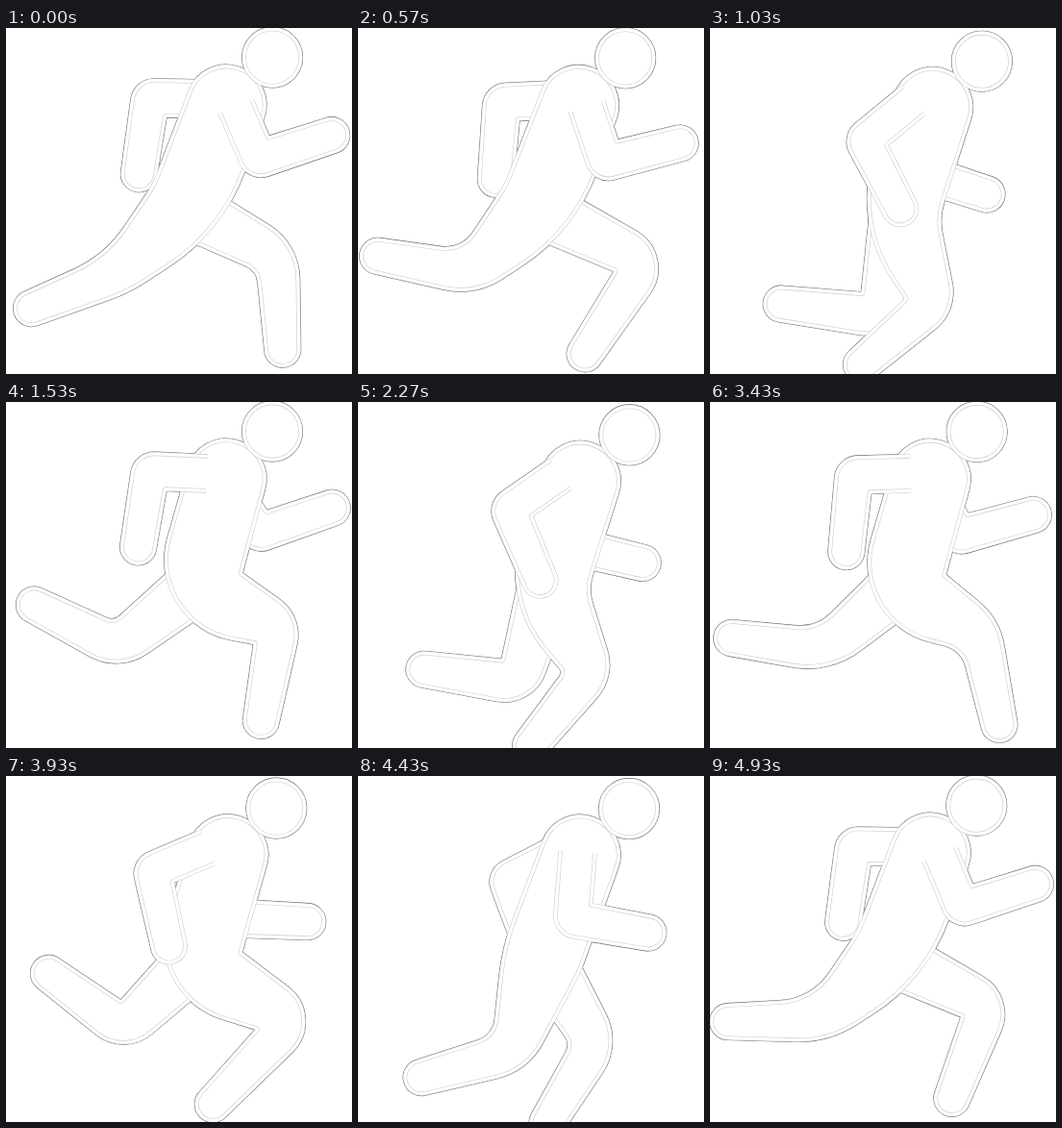
Recreate the animation shown at these times as an HTML page with a canvas. Size 360x360 px, loop 5 s.

```html
<!DOCTYPE html>
<html lang="en">
<head>
<meta charset="utf-8">
<title>Runner</title>
<style>
html, body { margin: 0; width: 100%; height: 100%; overflow: hidden; background: #fff; }
canvas { display: block; width: 360px; height: 360px; }
</style>
</head>
<body>
<canvas id="stage" width="360" height="360"></canvas>
<script>
const ctx = document.getElementById('stage').getContext('2d');
const STRIDE = 18.625;  // ticks per full stride, 30 ticks per second
const LAST = 148;

const wave = turns => Math.cos(2 * Math.PI * turns);

// Angles are in degrees, measured from straight down, forward positive.
function swing([x, y], angle, length) {
  const a = angle * Math.PI / 180;
  return [x + length * Math.sin(a), y + length * Math.cos(a)];
}

function armAt(phase) {
  const c = wave(phase + 0.024);
  const elbow = swing([215, 74], 65 * c - 27, 72 + 7 * c);
  return [elbow, swing(elbow, 50 + 59 * c, 80)];
}

// The trailing leg stays straighter on the near side than on the far side.
function legAt(phase, side) {
  const lift = phase - 0.445, push = phase - 0.05;
  const thigh = 6 + 66 * wave(lift) - 6 * wave(3 * lift);
  const flex = 70 + 12 * wave(phase - 0.25) - 14 * wave(phase)
    - 24 * wave(2 * push) - 8 * wave(4 * push) - side * 19 * Math.max(0, wave(phase));
  const stretch = 0.9 * Math.max(0, flex - 80);
  const knee = swing([194, 197], thigh, 98 + stretch);
  return [knee, swing(knee, thigh - flex, 96 + stretch)];
}

// Tapered limb along joints: rounded outer bends, tight inner bends, round tip.
function limb(pts, widths, bend, roundStart) {
  const path = new Path2D(), end = pts.length - 1;
  const dirs = pts.slice(1).map(([x, y], i) => {
    const dx = x - pts[i][0], dy = y - pts[i][1], len = Math.hypot(dx, dy) || 1;
    return [dx / len, dy / len];
  });
  const edge = (i, s) => {
    const [ax, ay] = dirs[Math.max(0, i - 1)], [bx, by] = dirs[Math.min(end - 1, i)];
    const k = s * widths[i] / Math.max(0.4, 1 + ax * bx + ay * by);
    return [pts[i][0] - (ay + by) * k, pts[i][1] + (ax + bx) * k];
  };
  const corner = (i, s, next) => {
    const [ax, ay] = dirs[i - 1], [bx, by] = dirs[i];
    const inner = 1 + 160 * (bend - 1) * Math.max(0, ax * bx + ay * by) ** 3;
    const outside = (ax * by - ay * bx) * s < 0;
    path.arcTo(...edge(i, s), ...edge(next, s), inner + (outside ? widths[i] * bend : 0));
  };
  const cap = (i, angle) =>
    path.arc(...pts[i], widths[i], angle + Math.PI / 2, angle - Math.PI / 2, true);
  const heading = ([x, y]) => Math.atan2(y, x);

  path.moveTo(...edge(0, 1));
  for (let i = 1; i < end; i++) corner(i, 1, i + 1);
  path.lineTo(...edge(end, 1));
  cap(end, heading(dirs[end - 1]));
  for (let i = end - 1; i > 0; i--) corner(i, -1, i - 1);
  path.lineTo(...edge(0, -1));
  if (roundStart) {
    cap(0, heading(dirs[0]) + Math.PI);
    path.closePath();
  }
  return path;
}

function stroke(path, color, width) {
  ctx.strokeStyle = color;
  ctx.lineWidth = width;
  ctx.stroke(path);
}

function draw(phase) {
  const arm = armAt(phase), farArm = armAt(phase + 0.5);
  const leg = legAt(phase, 1), farLeg = legAt(phase + 0.5, -1);
  const bob = (1 - wave(2 * phase + 0.04)) / 2;
  const reach = (leg[0][0] - 105) / 200;
  const chest = [229 + 3 * bob, 80 + 3 * bob];
  const hip = [189 + 6 * reach, 186 + 20 * reach];
  const sleeve = 0.27 * (arm[0][0] - 143);
  const head = new Path2D();
  head.arc(277 + 7 * bob, 30.5 + 5 * bob, 29.5, 0, 2 * Math.PI);

  const layers = [
    limb([[196, 192], ...farLeg], [28, 21, 17], 2),
    limb([[222, 74], ...farArm], [18, 18, 17], 1.2),
    limb([chest, hip, ...leg], [40, 41, 21, 17], 2, true),
    limb([[207 + sleeve, 74 + sleeve * 0.24], ...arm], [18, 18, 17], 1.2),
    head
  ];

  ctx.fillStyle = '#fff';
  ctx.fillRect(0, 0, 360, 360);
  layers.forEach(path => stroke(path, '#555', 5));
  for (const path of layers) {
    ctx.fill(path);
    stroke(path, '#ccc', 4.4);
    stroke(path, '#fff', 3.2);
  }
}

const start = performance.now();
function tick() {
  const time = (performance.now() - start) % 5000;
  draw(Math.min(LAST, Math.floor(time * 0.03 + 0.35)) / STRIDE);
  requestAnimationFrame(tick);
}
tick();
</script>
</body>
</html>
```
